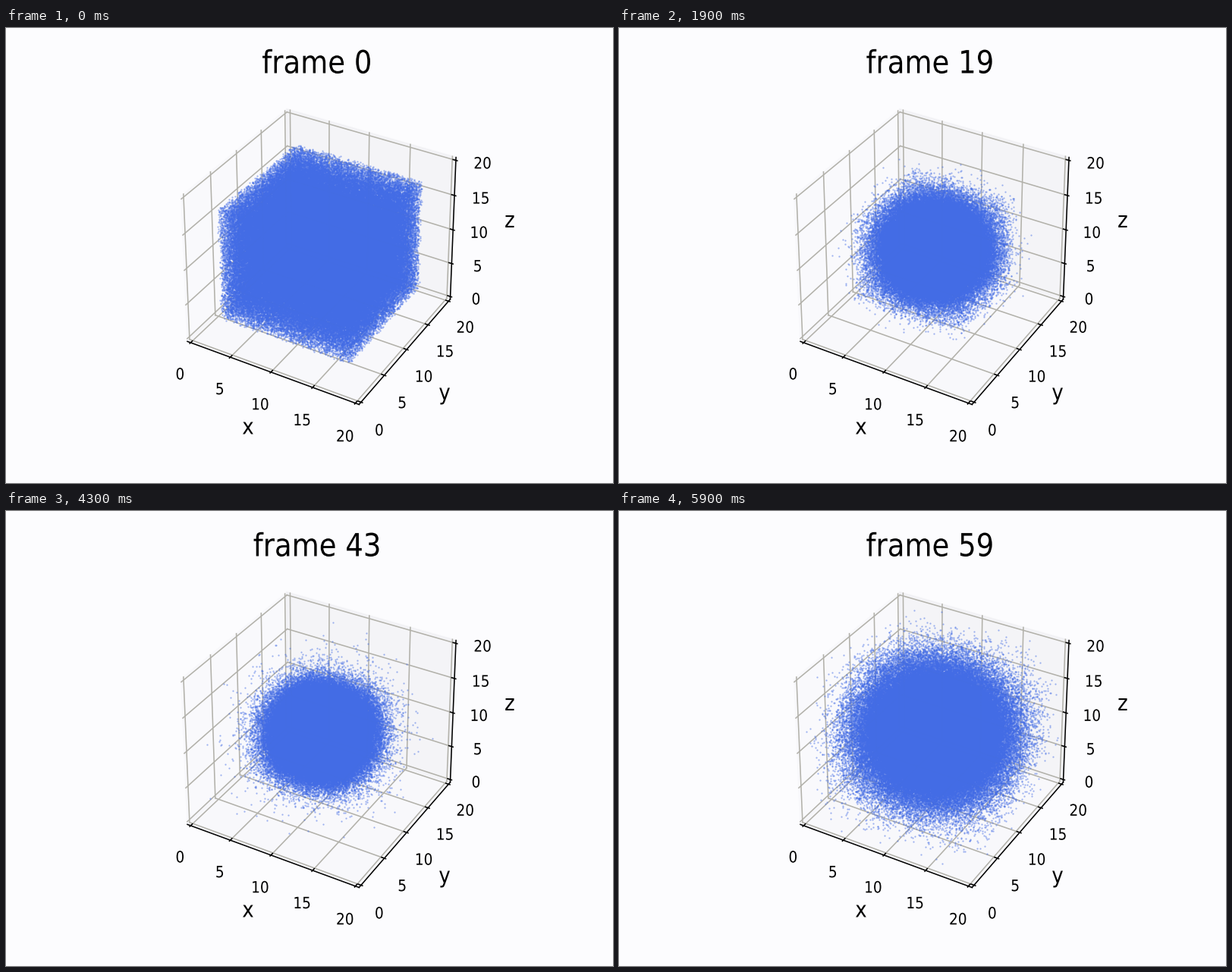
Write a matplotlib script that moves like this. It is 800 px wide and 600 px high and loops after 6 s.

```python
import numpy as np
import matplotlib.pyplot as plt
from matplotlib.animation import FuncAnimation
from matplotlib.patches import PathPatch, Polygon
from matplotlib.textpath import TextPath
from matplotlib.transforms import Affine2D

W, H, FRAMES = 800, 600, 60
BACK, BLUE, GRID = "#fcfcfe", "#436ce5", "#b2b1aa"

# A 6 x 4 inch layout is spread over the whole stage.
PT_X, PT_Y = W / 6 / 72, H / 4 / 72
THIN = 1.13
MID, LO, HI = 10, -20 / 48, 20 + 20 / 48
TICKS = range(0, 21, 5)
TICK_PAD, LABEL_PAD = 2.116, 4.6
ELEV, AZIM, DIST = np.radians(30), np.radians(-60), 10
CE, SE, CA, SA = (float(f(a)) for a in (ELEV, AZIM) for f in (np.cos, np.sin))

fig = plt.figure(figsize=(W / 100, H / 100), dpi=100, facecolor=BACK)
ax = fig.add_axes([0, 0, 1, 1])
ax.set_xlim(0, W)
ax.set_ylim(H, 0)
ax.axis("off")


def project(x, y, z):
    """Perspective view of the data box, in stage pixels."""
    unit = 8 / 7 / 20
    x, y, z = (x - MID) * unit, (y - MID) * unit, (z - MID) * unit * 0.75
    right = CA * y - SA * x
    ahead = CA * x + SA * y
    up = CE * z - SE * ahead
    depth = DIST - (CE * ahead + SE * z)
    px = 410 + 2177 * (right / depth + 0.0025)
    py = 298.5 - 2449 * (up / depth + 0.0025)
    return px, py


def line(a, b, color="black", zorder=2):
    (x0, y0), (x1, y1) = project(*a), project(*b)
    ax.plot([x0, x1], [y0, y1], color=color, lw=THIN, zorder=zorder,
            solid_capstyle="projecting")


def pane(corners, shade):
    ax.add_patch(Polygon([project(*c) for c in corners], lw=1.4, zorder=0,
                         color=(shade, shade, shade + 0.015, 0.5)))


def text_path(text, size, x, y, rise=0.0):
    """Text centred on x; rise is the drop of the baseline below y in ems."""
    path = TextPath((0, 0), text, size=size, prop="DejaVu Sans")
    box = path.get_extents()
    place = Affine2D().translate(-(box.x0 + box.x1) / 2, -rise * size)
    return place.scale(PT_X, -PT_Y).translate(x, y).transform_path(path)


def write(text, size, x, y, rise=0.0):
    patch = PathPatch(text_path(text, size, x, y, rise), fc="black", lw=0,
                      zorder=2)
    return ax.add_patch(patch)


def title_path(i):
    return text_path(f"frame {i}", 20, 409, 59.5)


def draw_box():
    pane([(LO, LO, LO), (LO, HI, LO), (LO, HI, HI), (LO, LO, HI)], 0.97)
    pane([(LO, HI, LO), (HI, HI, LO), (HI, HI, HI), (LO, HI, HI)], 0.935)
    pane([(LO, LO, LO), (HI, LO, LO), (HI, HI, LO), (LO, HI, LO)], 0.96)

    line((LO, LO, LO), (HI, LO, LO))
    line((HI, LO, LO), (HI, HI, LO))
    line((HI, HI, LO), (HI, HI, HI))

    out, inner = 1 / 6, 1 / 3
    near, far = LO - TICK_PAD, HI + TICK_PAD
    for t in TICKS:
        line((t, LO, LO), (t, HI, LO), GRID, 1)
        line((t, HI, LO), (t, HI, HI), GRID, 1)
        line((LO, t, LO), (HI, t, LO), GRID, 1)
        line((LO, t, LO), (LO, t, HI), GRID, 1)
        line((LO, LO, t), (LO, HI, t), GRID, 1)
        line((LO, HI, t), (HI, HI, t), GRID, 1)

        line((t, LO - out, LO), (t, LO + inner, LO))
        line((HI + out, t, LO), (HI - inner, t, LO))
        line((HI + out, HI, t), (HI - inner, HI, t))

        for spot in ((t, near, near), (far, t, near), (far, far, t)):
            write(str(t), 10, *project(*spot), rise=0.76)

    near, far = LO - LABEL_PAD, HI + LABEL_PAD
    spots = (MID, near, near), (far, MID, near), (far, far, MID)
    for name, spot in zip("xyz", spots):
        write(name, 14, *project(*spot), rise=0.276)


# Particles: a cold cube falls in, mixes, then swells into a round cloud.
COUNT = 180000
rng = np.random.default_rng(7)
start = 2 * rng.random((3, COUNT), dtype=np.float32) - 1
kick = rng.standard_normal((3, COUNT), dtype=np.float32)
late = rng.random(COUNT) < 0.055
reach, side = np.abs(start), np.sign(start)
mix_start = np.where(late, 19, 11).astype(np.float32)
MIX_TIME, MIX_END = 8, 27

INNER, SLAB = 0.6, 0.075
KEYS = [19, 35, 43, 51, 59]
CORE = [2.5, 3.5, 3.4, 3.4, 3.4]
SPREAD = [2.0, 0.7, 1.45, 2.6, 3.1]
HALO = [1.0, 1.7, 1.95, 1.6, 1.5]


def infall(t):
    """Shrinking cube whose inner part folds onto the three middle planes."""
    half = max(7.85 - 0.0043 * t * t, 3)
    thick = INNER + (SLAB - INNER) * min(t / 11, 1) ** 1.5
    stretch = (1 - thick) / (1 - INNER)
    folded = np.where(reach < INNER, reach * (thick / INNER),
                      1 - (1 - reach) * stretch)
    return half * np.where(late, start, side * folded)


def cloud(t):
    core, spread, halo = (float(np.interp(t, KEYS, v))
                          for v in (CORE, SPREAD, HALO))
    width = np.where(late, spread * halo, spread).astype(np.float32)
    return core * start + width * kick


def particles(t):
    if t <= mix_start.min():
        pos = infall(t)
    elif t >= MIX_END:
        pos = cloud(t)
    else:
        mix = np.clip((t - mix_start) / MIX_TIME, 0, 1)
        mix = mix * mix * (3 - 2 * mix)
        pos = (1 - mix) * infall(t) + mix * cloud(t)
    pos = pos[:, (np.abs(pos) < MID).all(axis=0)]
    return project(*(pos + MID))


draw_box()
title = ax.add_patch(PathPatch(title_path(0), fc="black", lw=0, zorder=2))
dots, = ax.plot([], [], "o", ms=1.6, mew=0, color=BLUE, alpha=0.5, zorder=3)


def update(i):
    title.set_path(title_path(i))
    dots.set_data(*particles(i))
    return title, dots


anim = FuncAnimation(fig, update, frames=FRAMES, interval=100, repeat=True)
plt.show()
```
